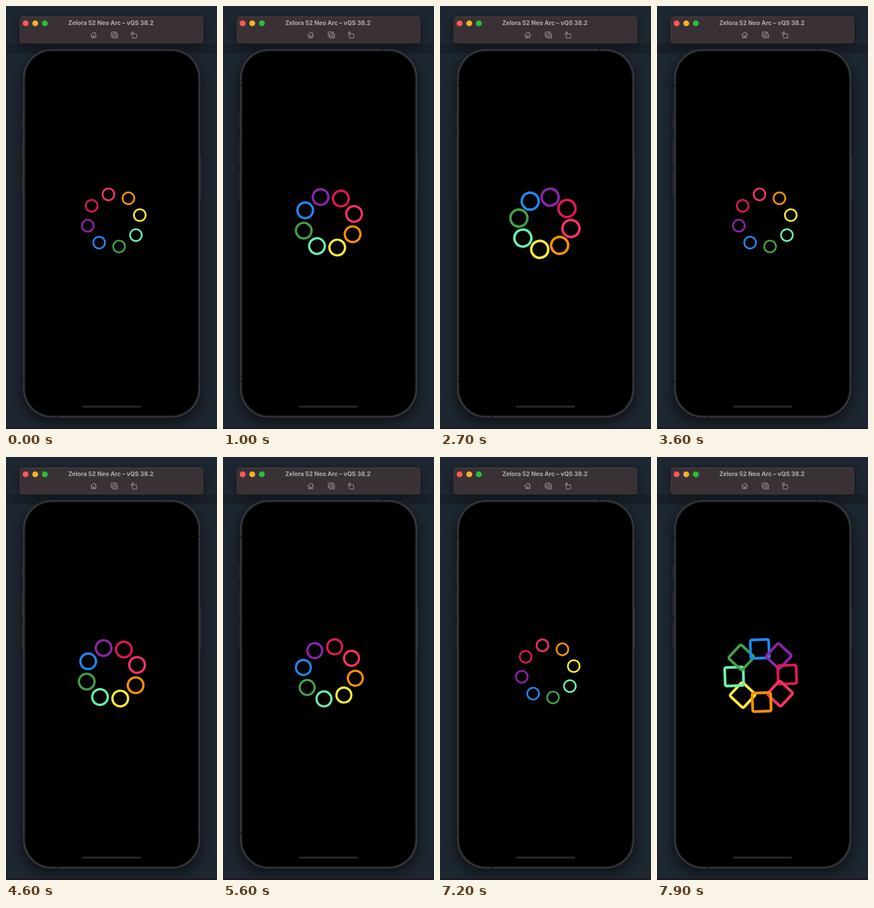
An HTML page for the animation above (8000 ms loop, 366 by 732 pixels).

```html
<!DOCTYPE html>
<html lang="en">
<head>
<meta charset="utf-8">
<title>Ring loader</title>
<style>
  html, body { margin: 0; width: 100%; height: 100%; overflow: hidden; background: #1d2731; }
  svg { display: block; width: 366px; height: 732px; }
  .title { font: 700 10.4px Inter, "Liberation Sans", sans-serif; fill: #b4acb0; text-anchor: middle; }
  .icons { fill: none; stroke: #aaa2a6; stroke-width: 1; stroke-linejoin: round; stroke-linecap: round; }
  .buttons { fill: #20242a; stroke: #31353a; stroke-width: .6; }
  .bands { fill: #1c1c1e; }
  #ring rect { fill: none; stroke-width: 4.7; stroke-linejoin: round; }
</style>
</head>
<body>
<svg viewBox="0 0 366 732">
  <defs>
    <filter id="blur" x="-20%" y="-20%" width="140%" height="140%">
      <feGaussianBlur stdDeviation="10"/>
    </filter>
  </defs>

  <!-- desktop -->
  <rect width="366" height="732" fill="#1d2731"/>
  <rect y="65" width="366" height="17" fill="#182029"/>
  <rect y="729.5" width="366" height="3" fill="#1a1823"/>
  <g filter="url(#blur)" fill="#000">
    <rect x="26" y="84" width="314" height="638" rx="48" opacity=".5"/>
    <rect x="24" y="24" width="318" height="48" rx="6" opacity=".35"/>
  </g>

  <!-- window bar -->
  <rect x="22.5" y="17.5" width="321" height="48" rx="5.5" fill="#3a3136" stroke="#12161b"/>
  <path d="M27 18.5H339" stroke="#554c51" stroke-width=".8"/>
  <circle cx="34" cy="30" r="5.1" fill="#fe5a52"/>
  <circle cx="50.7" cy="30" r="5.1" fill="#f8b126"/>
  <circle cx="67.4" cy="30" r="5.1" fill="#25c138"/>
  <text class="title" x="182" y="33.4">Zelora 52 Neo Arc – vQS 38.2</text>
  <g class="icons">
    <path d="M146.8 50L152 45.2L157.2 50M148.3 49.2V54.8H155.7V49.2M151 54.6V51.5H153V54.6M155 46V47.6"/>
    <path d="M184.3 53H183.5Q182.5 53 182.5 52V46Q182.5 45 183.5 45H190.5Q191.5 45 191.5 46V46.8"/>
    <path d="M185.5 48.2H187.2L188 47.2H190.8L191.6 48.2H193.5V55.2H185.5Z"/>
    <circle cx="189.5" cy="51.6" r="1.8"/>
    <rect x="219" y="48.3" width="7.8" height="7.2" rx=".8"/>
    <path d="M217 49.3V47.4Q217 45.8 218.6 45.8H221M219.5 44.2L221.2 45.8L219.5 47.4"/>
  </g>

  <!-- phone -->
  <g class="buttons">
    <rect x="27.4" y="188" width="4" height="22" rx="1"/>
    <rect x="27.4" y="230" width="4" height="45" rx="1"/>
    <rect x="27.4" y="286" width="4" height="45" rx="1"/>
    <rect x="334.6" y="260" width="3.6" height="72" rx="1"/>
  </g>
  <rect x="30.5" y="75.5" width="305.5" height="636" rx="49" fill="#28292b" stroke="#48494b" stroke-width="1.2"/>
  <rect x="33" y="78" width="300.5" height="631" rx="46.5" fill="#000" stroke="#1c1d1f"/>
  <g class="bands">
    <rect x="30" y="136" width="3" height="3"/>
    <rect x="333.4" y="136" width="3" height="3"/>
    <rect x="30" y="648" width="3" height="3"/>
    <rect x="333.4" y="648" width="3" height="3"/>
    <rect x="275" y="75" width="3" height="2.6"/>
    <rect x="88" y="709.4" width="3" height="2.6"/>
  </g>
  <rect x="132" y="691.4" width="102" height="3.6" rx="1.8" fill="#272727"/>

  <g id="ring"></g>
</svg>

<script>
  const LOOP = 8000, SWING = 900, LEAD = 268;
  const RADIUS = 46, SIDE = 32.2;
  // Clockwise, painted in this order; pink sits seventh.
  const COLORS = ['#ffeb3b', '#69f0ae', '#43a047', '#1e88f0', '#8e24aa', '#e0194f', '#ff3366', '#ff9100'];
  const ring = document.getElementById('ring');

  const tiles = COLORS.map(color => {
    const tile = document.createElementNS('http://www.w3.org/2000/svg', 'rect');
    const attrs = { x: -SIDE / 2, y: -SIDE / 2, width: SIDE, height: SIDE, stroke: color };
    for (const name in attrs) tile.setAttribute(name, attrs[name]);
    return ring.appendChild(tile);
  });

  // cubic-bezier(.42, 0, .58, 1)
  function easeInOut(x) {
    let lo = 0, hi = 1;
    for (let i = 0; i < 24; i++) {
      const s = (lo + hi) / 2;
      const bx = 1.26 * s * (1 - s) ** 2 + 1.74 * s * s * (1 - s) + s ** 3;
      if (bx < x) lo = s; else hi = s;
    }
    return lo * lo * (3 - 2 * lo);
  }

  // 0 to 1 and back; every second swing starts a touch early.
  function progress(t) {
    const early = 17 * Math.sin(Math.PI * t / (4 * SWING)) ** 8;
    const x = (t + LEAD + early) / SWING % 2;
    return easeInOut(x < 1 ? x : 2 - x);
  }

  function draw() {
    const u = progress(performance.now() % LOOP);
    const shift = 2.5 * u + 5.4 * u * u;
    const turn = 180 * u - 45;
    const scale = 0.55 + 0.45 * u;
    const corner = Math.min(SIDE / 2, 1.5 + 100 * (1 - u));
    ring.setAttribute('transform', `translate(${187.6 - shift} ${370.4 + shift}) rotate(${turn})`);
    tiles.forEach((tile, i) => {
      tile.setAttribute('transform', `rotate(${45 * (i + 2)}) translate(0 ${-RADIUS}) scale(${scale})`);
      tile.setAttribute('rx', corner);
    });
    requestAnimationFrame(draw);
  }
  draw();
</script>
</body>
</html>
```
